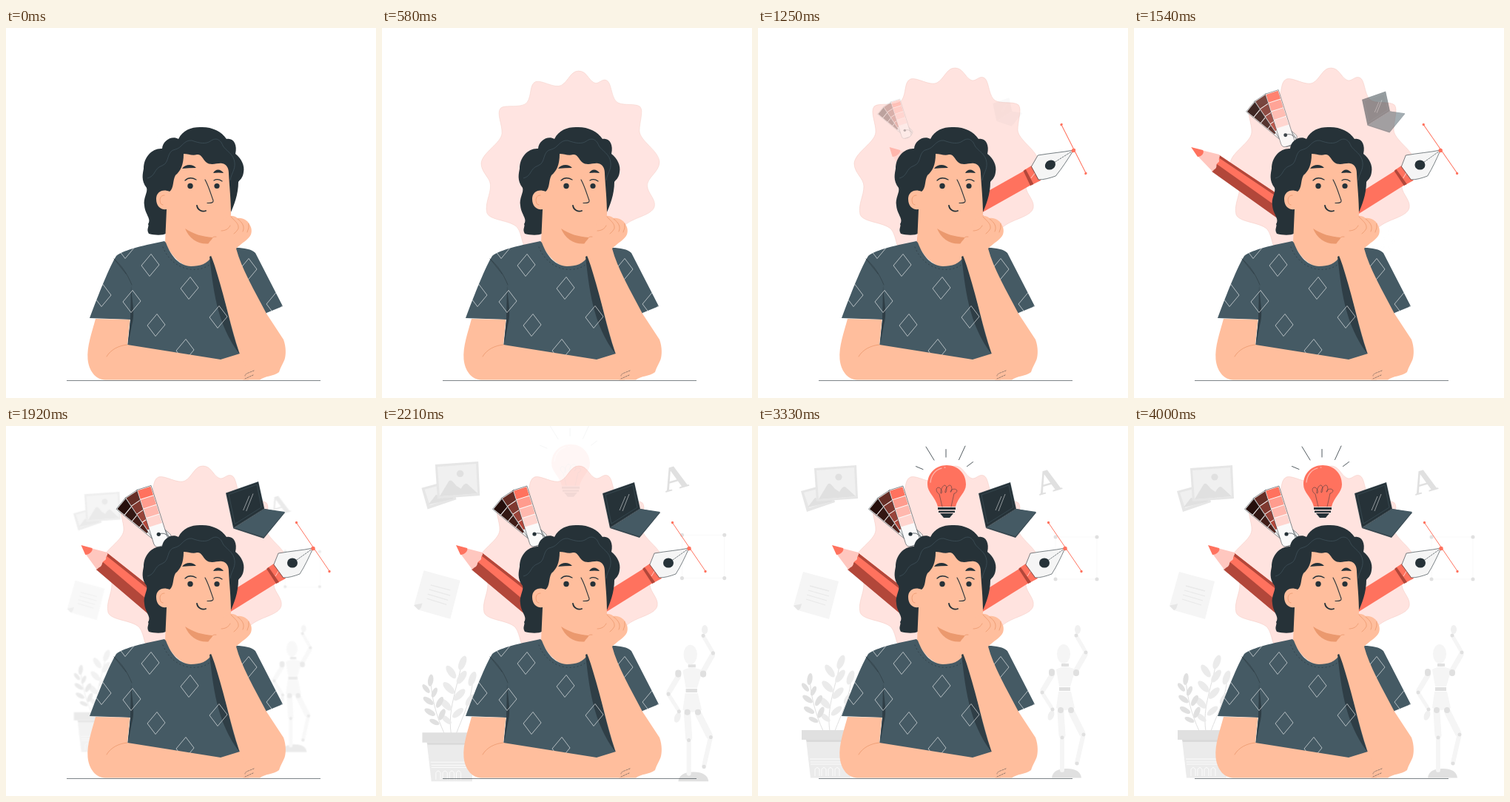
These frames come from a looping animation (500x500 px, 4040 ms). An HTML page:

```html
<!DOCTYPE html>
<html lang="en">
<head>
<meta charset="utf-8">
<title>Creative thinking</title>
<style>
html, body { margin: 0; width: 100%; height: 100%; overflow: hidden; background: #fff; }
svg { display: block; width: 100%; height: 100%; }
.line { fill: none; stroke: #263238; stroke-linecap: round; stroke-linejoin: round; }
.crease { fill: none; stroke: #eb996e; stroke-width: .8; stroke-linecap: round; }
.limb { fill: none; stroke: #f5f5f5; stroke-linecap: round; stroke-linejoin: round; }
</style>
</head>
<body>
<svg viewBox="0 0 500 500">
<defs>
  <path id="shirt" d="M214 288C190 293 160 299 149 308C140 322 125 360 113 392L168 394L164 430L290 449L318 442L352 385L374 376L337 304C332 299 322 297 311 297L279 308C272 319 262 322 250 322C235 321 224 311 216 290Z"/>
  <clipPath id="shirtClip"><use href="#shirt"/></clipPath>
</defs>

<g id="scenery">
  <g id="photos">
    <path fill="#e6e6e6" d="M58 88L98 77L104 103L66 116Z"/>
    <path fill="#f0f0f0" d="M62 90L95 81L100 100L69 111Z"/>
    <path fill="#e0e0e0" d="M67 110L77 97L86 99L99 99L100 102Z"/>
    <path fill="#e6e6e6" d="M76 57L133 53L135 98L79 102Z"/>
    <path fill="#f0f0f0" d="M79 60L130 56L132 95L82 99Z"/>
    <path fill="#e0e0e0" d="M82 99L94 79C97 76 99 79 104 85L110 89C114 82 117 80 120 84L132 95Z"/>
    <circle cx="109" cy="69" r="4.6" fill="#e0e0e0"/>
  </g>
  <path fill="#f5f5f5" d="M61 197L109 210L96 261L54 249L48 243Z"/>
  <path fill="#e6e6e6" d="M48 243C51 241 55 242 59 240C58 245 57 248 54 249Z"/>
  <path fill="none" stroke="#e9e9e9" stroke-width="1.3" d="M70 216L96 223M68 222L96 230M66 228L93 236M65 234L91 242"/>
  <text transform="translate(396 89.5) rotate(-16)" text-anchor="middle" font-size="46" font-weight="700" fill="#e0e0e0" font-family="'Liberation Serif', 'Noto Serif', serif">A</text>
  <path fill="none" stroke="#f9f9f9" d="M402 150H458V207H402Z"/>
  <path stroke="#e0e0e0" stroke-width="5" stroke-linecap="round" d="M402 150h0M458 150h0M402 207h0M458 207h0"/>

  <g id="mannequin">
    <path fill="#e0e0e0" d="M397 475.5C398 467 405 463 417 463C429 463 436 467 437 475.5Z"/>
    <path class="limb" stroke-width="9" d="M409 387L411 418M424 387L438 415"/>
    <path class="limb" stroke-width="6" d="M411 424L411 465M439 420L431 455"/>
    <path class="limb" stroke-width="7" d="M430 330L442 309M397 337L385 357"/>
    <path class="limb" stroke-width="5" d="M442 304L431 285M385 362L397 381"/>
    <ellipse cx="432" cy="275" rx="4" ry="6" fill="#f0f0f0"/>
    <ellipse cx="396" cy="391" rx="4" ry="7" transform="rotate(20 396 391)" fill="#f0f0f0"/>
    <path fill="#f5f5f5" d="M403 329Q414 322 429 329L422 352H407ZM406 359H423L428 381Q415 387 403 381Z"/>
    <path fill="#e0e0e0" d="M410 321H420V325H410ZM407 353H422V358H407Z"/>
    <ellipse cx="413" cy="308" rx="9" ry="13" fill="#f5f5f5"/>
    <path stroke="#e0e0e0" stroke-width="8" stroke-linecap="round" d="M397 332v2M430 333v1M409 384h0M423 384h0"/>
    <path stroke="#e0e0e0" stroke-width="5" stroke-linecap="round" d="M443 306h0M384 360h0M398 383h0M430 283h0M411 421h0M440 417h0M431 456h0"/>
  </g>

  <g id="plant">
    <path fill="none" stroke="#e0e0e0" d="M70 340C71 365 78 390 88 412M112 315C106 350 92 380 97 412M125 335C128 360 112 390 104 412"/>
  </g>
  <path fill="#ebebeb" d="M65 424H125V475.5H71Z"/>
  <path fill="#e0e0e0" d="M59 411H130V424H59Z"/>
  <path fill="#dadada" d="M65 424H125V427H66Z"/>
  <path fill="none" stroke="#fff" stroke-width=".8" d="M70 450H120M71 454H120M71 457H120M77 473V464q3 -5 6 0v9M86 473V464q3 -5 6 0v9M95 473V464q3 -5 6 0v9M104 473V464q3 -5 6 0v9"/>
</g>

<path id="blob" fill="#ffe3df" stroke="#f3c6bf" stroke-width=".5" d="M266 54C277 54 279 65 287 70C294 74 298 64 305 67C312 70 311 87 318 96C325 104 345 98 352 104C357 110 351 125 351 138C352 152 378 165 379 181C379 195 361 203 362 215C363 225 374 233 372 243C369 256 342 258 330 270L305 290L290 312H198C186 300 188 282 180 272C170 262 142 263 138 252C135 238 143 227 143 214C143 203 130 196 130 183C131 168 158 155 159 141C160 130 151 113 157 106C163 100 186 107 194 98C201 88 197 73 206 69C215 66 232 79 242 74C252 68 255 54 266 54Z"/>

<g id="pen">
  <path fill="#ff725e" d="M353 193L366 212L225 300V273Z"/>
  <path fill="#ff725e" d="M353 192L362 186L378 206L365 213Z"/>
  <path fill="#b2473a" d="M352 193L355 191L369 211L365 213Z"/>
  <path stroke="#ffc7bf" stroke-width="1" d="M364 203L372 190"/>
  <path class="line" stroke-width=".6" style="fill:#f5f5f5" d="M362 187L368 172C385 169 400 168 415 165C409 178 404 189 397 200C389 203 382 205 375 205Z"/>
  <path class="line" stroke-width=".6" stroke-dasharray="2 1.5" d="M390 183L414 166"/>
  <ellipse cx="387" cy="185" rx="7" ry="6.6" fill="#263238"/>
  <path stroke="#ff725e" stroke-width="1" d="M392 130L437 196"/>
  <path stroke="#ff725e" stroke-width="3.4" stroke-linecap="round" d="M392.5 130.5h0M437 196.5h0"/>
  <circle cx="415" cy="165.5" r="2.7" fill="#ff725e"/>
</g>

<g id="pencil">
  <path fill="#ff725e" d="M136 172L245 257V298L122 193Z"/>
  <path fill="#b2473a" d="M136 172L245 257V262L134 175ZM130 184L245 280V298L121 194Z"/>
  <path fill="#ffc7bf" d="M113 165L136 171C137 174 134 176 134 178C135 182 129 182 129 186C128 191 125 190 122 194L107 174Z"/>
  <path fill="#ff725e" d="M100 161L115 165C117 169 111 174 106 174Z"/>
</g>

<g id="swatches"></g>

<g id="laptop">
  <path fill="#37474f" d="M308 138L349 112L376 117L348 151Z"/>
  <path fill="#455a64" d="M310 137L349 112L376 116L348 149Z"/>
  <path fill="#37474f" d="M298 91L341 76L349 112L308 138Z"/>
  <path fill="#263238" d="M299 91.5L340.500 77L348 111.500L308.500 136.500Z"/>
  <path fill="none" stroke="#455a64" stroke-width=".5" d="M302 93L339 80L345 110L310 132Z"/>
  <path stroke="#fff" stroke-width=".5" d="M321 114L329 95M325 115L334 92"/>
</g>

<g id="bulb">
  <path fill="#ff725e" d="M255 53C270 53 281 64 281 79C281 90 270 96 267 109H243C240 96 229 90 229 79C229 64 240 53 255 53Z"/>
  <path fill="none" stroke="#ffb8ae" stroke-width="1.2" stroke-linecap="round" d="M233 76C234 66 240 59 248 57M252 56h1"/>
  <path class="line" stroke-width=".5" d="M249 109L245 92C240 89 240 83 244 83C248 83 250 91 247 91C246 87 250 79 253 80C256 82 255 90 253 90C252 86 257 79 260 80C263 82 262 90 260 89C260 86 266 83 269 87C269 89 267 91 265 91L261 109"/>
  <path fill="#263238" d="M243 110H267V113H243ZM244 114.5H266V117H244ZM246 118H264L259 124H251Z"/>
  <path class="line" stroke-width=".8" d="M227 28L238 46M254 31.5V42M280 27L271.5 45.5M213.5 54.5L223 58.5M290.5 48.5L282.5 54.5"/>
</g>

<g id="person">
  <path fill="#263238" d="M193 278C189 272 194 268 192 265C197 258 188 252 187 240C185 230 192 222 190 216C182 206 185 196 186 190C186 174 198 162 211 163C212 152 224 145 233 150C239 138 250 134 262 134C277 133 291 139 298 150C307 148 313 157 310 170C318 176 323 186 321 195C320 203 316 205 314 208C314 225 308 240 303 251L260 262L218 277C211 281 201 280 193 278Z"/>
  <path fill="none" stroke="#455a64" stroke-width=".6" d="M191 203C203 200 199 190 211 186C222 182 216 166 229 164C238 162 240 151 251 152C262 156 270 157 276 153C284 147 290 151 293 159C297 166 308 170 309 182C310 192 304 197 303 206"/>
  <path fill="#ffbe9d" d="M240 170C246 170 252 173 258 171C264 170 266 177 270 181C277 187 285 182 292 183C298 184 301 189 301 197C302 215 304 232 304 252L300 288L279 309C266 331 234 331 215 290L217 245C209 246 203 241 203 231C203 221 212 217 221 221C227 217 225 206 229 199C236 193 240 185 240 170Z"/>
  <path fill="#eb996e" d="M242 271C254 279 266 282 279 283L277 291C262 294 248 286 242 271Z"/>
  <path class="crease" stroke-width="1" d="M214 226C208 226 207 232 209 237Q210 239 212 239"/>
  <path fill="#263238" d="M238 190C242 184 252 183 257 189Q247 189 238 190ZM280 196C283 190 290 190 294 196Q287 195 280 196Z"/>
  <circle cx="249" cy="213.5" r="3.7" fill="#263238"/>
  <circle cx="285" cy="213.5" r="3.6" fill="#263238"/>
  <path class="line" stroke-width="1.3" d="M242 206Q248 200 257 205M281 206Q286 203 292 207"/>
  <path class="line" stroke-width="1.1" d="M269 205C274 214 277 225 280 233Q281 237 272 236.5"/>
  <path class="line" stroke-width="1.8" d="M258 240C259 246 265 249 270 247"/>

  <use href="#shirt" fill="#455a64"/>
  <path fill="#2f3e46" d="M275 309C280 350 284 400 316 441C300 400 292 340 281 306ZM169 348C170 368 175 385 170 402L165 428L168 394Z"/>
  <path class="line" stroke-width=".5" d="M146 312C155 320 163 330 170 347M146 312L162 332"/>
  <path class="line" stroke-width=".6" stroke-dasharray="1 4" d="M212 296C226 331 266 334 281 314"/>
  <g id="diamonds" clip-path="url(#shirtClip)" fill="none" stroke="#fff" stroke-width=".6"></g>

  <path fill="#ffbe9d" d="M121 393L167.5 394L164 428L290 448L316 440L345 455L328 475.5H134C120 475 112 462 110.5 448C109 430 116 412 121 393Z"/>
  <path fill="#ffbe9d" d="M272 294C275 287 284 280 291 274C287 267 290 261 294 258C298 253 307 252 313 257C320 256 327 261 328 264C333 270 332 276 331 279C328 286 319 290 311 298C318 325 336 355 352 386L375 421C379 432 378 442 377 446C376 451 371 458 369 465C361 471 350 470 343 475.5H320L330 464C322 455 318 446 315 438C304 405 297 370 285 331Q279 310 272 297Z"/>
  <path class="crease" d="M136 444C141 435 152 429 164 428M304 255C309 261 315 264 314 271Q312 275 308 278M313 258C320 263 323 269 320 275M291 274C297 274 301 271 303 267M328 264Q329 270 326 276M278 284Q281 281 284 282"/>
  <path class="line" stroke-width=".5" stroke-dasharray="2 1.5" d="M335 463C328 466 323 467 323 470M334 469L323 474"/>
  <path stroke="#263238" stroke-width=".6" d="M82 476.5H425"/>
</g>
</svg>

<script>
const el = id => document.getElementById(id);

const diamonds = [[195, 320], [248, 351], [203, 401], [287, 390], [242, 435], [130, 361], [170, 369], [162, 296], [327, 326], [364, 372]];
el('diamonds').innerHTML = diamonds.map(([x, y]) =>
  `<path d="M${x + 1} ${y - 14.5}L${x + 12} ${y}L${x - 1} ${y + 15.5}L${x - 12} ${y + 1}Z"/>`).join('');

const cards = [
  [-50.5, ['#260f0c', '#331713', '#401d18', '#4d221c']],
  [-34, ['#662e26', '#803930', '#99443a', '#b2473a']],
  [-17.6, ['#ff725e', '#ff9c8e', '#ffb8ae', '#ffd5cf']]
];
el('swatches').innerHTML = cards.map(([angle, tones]) =>
  `<g transform="translate(206 146) rotate(${angle})">
    <path d="M-10 -65H10V10Q10 16 4 16H-4Q-10 16 -10 10Z" fill="#fafafa" stroke="#263238" stroke-width=".5"/>` +
  tones.map((c, i) => `<path d="M-9 ${-64 + i * 13}h18v12h-18z" fill="${c}"/>`).join('') +
  '</g>').join('') +
  '<circle cx="206" cy="146" r="2.6" fill="#263238"/><path class="line" stroke-width=".7" d="M206 146Q214 142 220 150"/>';

// x, y, tilt, half length
const darkLeaves = [
  [70, 342, 8, 8], [64, 353, -40, 7], [75, 358, 25, 7], [67, 369, -55, 8],
  [82, 371, 30, 8], [69, 384, -60, 8], [85, 387, 25, 8], [75, 397, -65, 7]
];
const paleLeaves = [
  [112, 319, 22, 10], [97, 331, -35, 10], [111, 338, 35, 10], [94, 352, -45, 10], [108, 361, 45, 10],
  [90, 374, -45, 10], [106, 385, 50, 9], [91, 394, -50, 8], [125, 340, 20, 10], [122, 368, 35, 9]
];
const drawLeaves = (leaves, color) => el('plant').insertAdjacentHTML('beforeend', leaves.map(([x, y, tilt, r]) =>
  `<ellipse cx="${x}" cy="${y}" rx="${r * .45}" ry="${r}" transform="rotate(${tilt} ${x} ${y})" fill="${color}"/>`).join(''));
drawLeaves(paleLeaves, '#ebebeb');
drawLeaves(darkLeaves, '#e0e0e0');

const LOOP = 4040, LEAD = 40;
const cubic = (t, a, b) => 3 * a * t * (1 - t) ** 2 + 3 * b * t * t * (1 - t) + t ** 3;

// cubic-bezier(.36, -.01, .5, 1.38), overshooting near the end
function ease(x) {
  if (x <= 0) return 0;
  if (x >= 1) return 1;
  let lo = 0, hi = 1;
  for (let i = 0; i < 24; i++) {
    const mid = (lo + hi) / 2;
    if (cubic(mid, .36, .5) < x) lo = mid; else hi = mid;
  }
  return cubic(lo, -.01, 1.38);
}

function pose(id, transform, opacity) {
  el(id).setAttribute('transform', transform);
  el(id).setAttribute('opacity', Math.max(0, Math.min(1, opacity)));
}

function zoomIn(id, cx, cy, x) {
  const p = ease(x);
  pose(id, `translate(${cx} ${cy}) scale(${.5 + p / 2}) translate(${-cx} ${-cy})`, p);
}

// Slides in sideways while the skew swings past upright and back
function dashIn(id, shift, cy, x) {
  const side = Math.sign(shift), stops = [0, .6, .8, 1], skews = [-20, 10, -2, 0];
  const i = x < .6 ? 0 : x < .8 ? 1 : 2;
  const p = ease((x - stops[i]) / (stops[i + 1] - stops[i]));
  const skew = side * (skews[i] + (skews[i + 1] - skews[i]) * p);
  const dx = i ? 0 : shift * (1 - p);
  pose(id, `translate(${dx} ${cy}) skewX(${skew}) translate(0 ${-cy})`, i ? 1 : p);
}

function draw(ms) {
  const s = (ms % LOOP + LEAD) / 1000;
  zoomIn('blob', 254.5, 181, s);
  dashIn('pen', -150, 230, s - .69);
  dashIn('pencil', 110, 235, s - 1.09);
  zoomIn('swatches', 184, 124, s - 1);
  zoomIn('laptop', 337.5, 113.5, s - 1.2);
  zoomIn('scenery', 254, 267, s - 1.5);
  const p = ease((s - 2) / 2);
  pose('bulb', `translate(0 ${-30 * (1 - p)})`, p);
}

let start;
function tick(now) {
  start ??= now;
  draw(now - start);
  requestAnimationFrame(tick);
}
draw(0);
requestAnimationFrame(tick);
</script>
</body>
</html>
```
